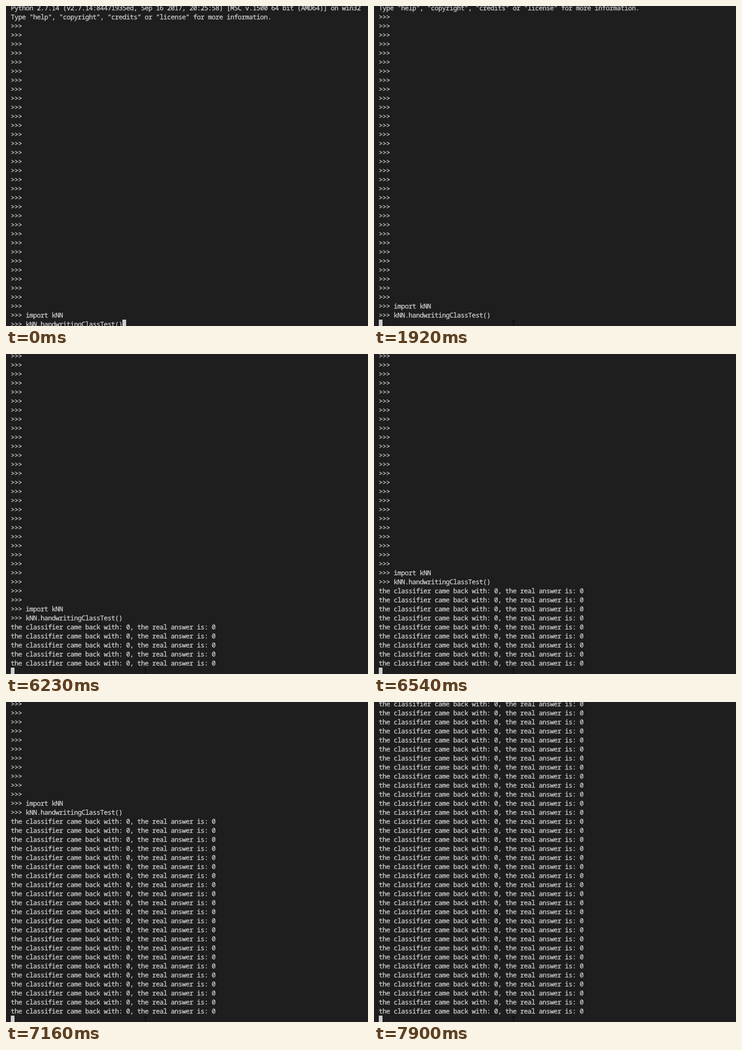
An HTML page that plays this animation: 681x602 px, repeating every 8000 ms.

```html
<!DOCTYPE html>
<html lang="en">
<head>
<meta charset="utf-8">
<title>Python session</title>
<style>
  html, body {
    margin: 0;
    width: 100%;
    height: 100%;
    overflow: hidden;
  }
  #stage {
    position: relative;
    width: 100%;
    height: 100%;
    overflow: clip;
    contain: strict;
    background: #1e1e1e;
  }
  #screen {
    position: absolute;
    left: 9px;
    top: -5px;
    margin: 0;
    color: #ccc;
    font: 12.5px/17px "Noto Sans Mono", "DejaVu Sans Mono", monospace;
    letter-spacing: -0.5px;
    font-variant-ligatures: none;
    text-rendering: geometricPrecision;
    -webkit-text-stroke: 0.3px #ccc;
  }
  #caret {
    position: absolute;
    top: 590px;
    width: 7px;
    height: 12px;
    background: #ccc;
  }
  #mouse {
    position: absolute;
    left: 0;
    top: 0;
    fill: #000;
  }
</style>
</head>
<body>
<div id="stage">
  <pre id="screen"></pre>
  <div id="caret"></div>
  <svg id="mouse" width="7" height="16" shape-rendering="crispEdges">
    <path d="M0 0h3v1h-3zM4 0h3v1h-3zM3 1h1v14h-1zM0 15h3v1h-3zM4 15h3v1h-3z"/>
  </svg>
</div>
<script>
const LOOP = 8000, ROWS = 36, CHAR = 7, LEFT = 9;
const ENTER = 1920, FIRST_RESULT = 5870;
const PAUSE = 7340, RESUME = 7475;
const MOUSE_IN = 390, MOUSE_STEP = 145;
const RESULT = 'the classifier came back with: 0, the real answer is: 0';

const history = [
  'Python 2.7.14 (v2.7.14:84471935ed, Sep 16 2017, 20:25:58) [MSC v.1500 64 bit (AMD64)] on win32',
  'Type "help", "copyright", "credits" or "license" for more information.',
  ...Array(32).fill('>>>'),
  '>>> import kNN',
  '>>> kNN.handwritingClassTest()'
];

const screen = document.getElementById('screen');
const caret = document.getElementById('caret');
const mouse = document.getElementById('mouse');

// The output speeds up steadily, apart from one short stall.
function resultCount(t) {
  if (t < FIRST_RESULT) return 0;
  const running = Math.min(t, PAUSE) + Math.max(0, t - RESUME);
  const s = (running - FIRST_RESULT) / 1000;
  return Math.floor(1 + 9.2 * s + 5.54 * s * s);
}

function drawText(t) {
  const lines = [...history, ...Array(resultCount(t)).fill(RESULT)];
  if (t >= ENTER) lines.push('');
  const text = lines.slice(-ROWS).join('\n');
  if (text !== screen.textContent) screen.textContent = text;
  caret.style.left = LEFT + lines.at(-1).length * CHAR + 'px';
}

function drawMouse(t) {
  const step = Math.min(2, Math.floor((t - MOUSE_IN) / MOUSE_STEP));
  mouse.style.visibility = step < 0 ? 'hidden' : 'visible';
  mouse.style.transform = `translate(${263 - 2 * step}px, ${593 - Math.min(1, step)}px)`;
}

const start = performance.now();
function tick() {
  const t = (performance.now() - start) % LOOP;
  drawText(t);
  drawMouse(t);
  requestAnimationFrame(tick);
}
tick();
</script>
</body>
</html>
```
